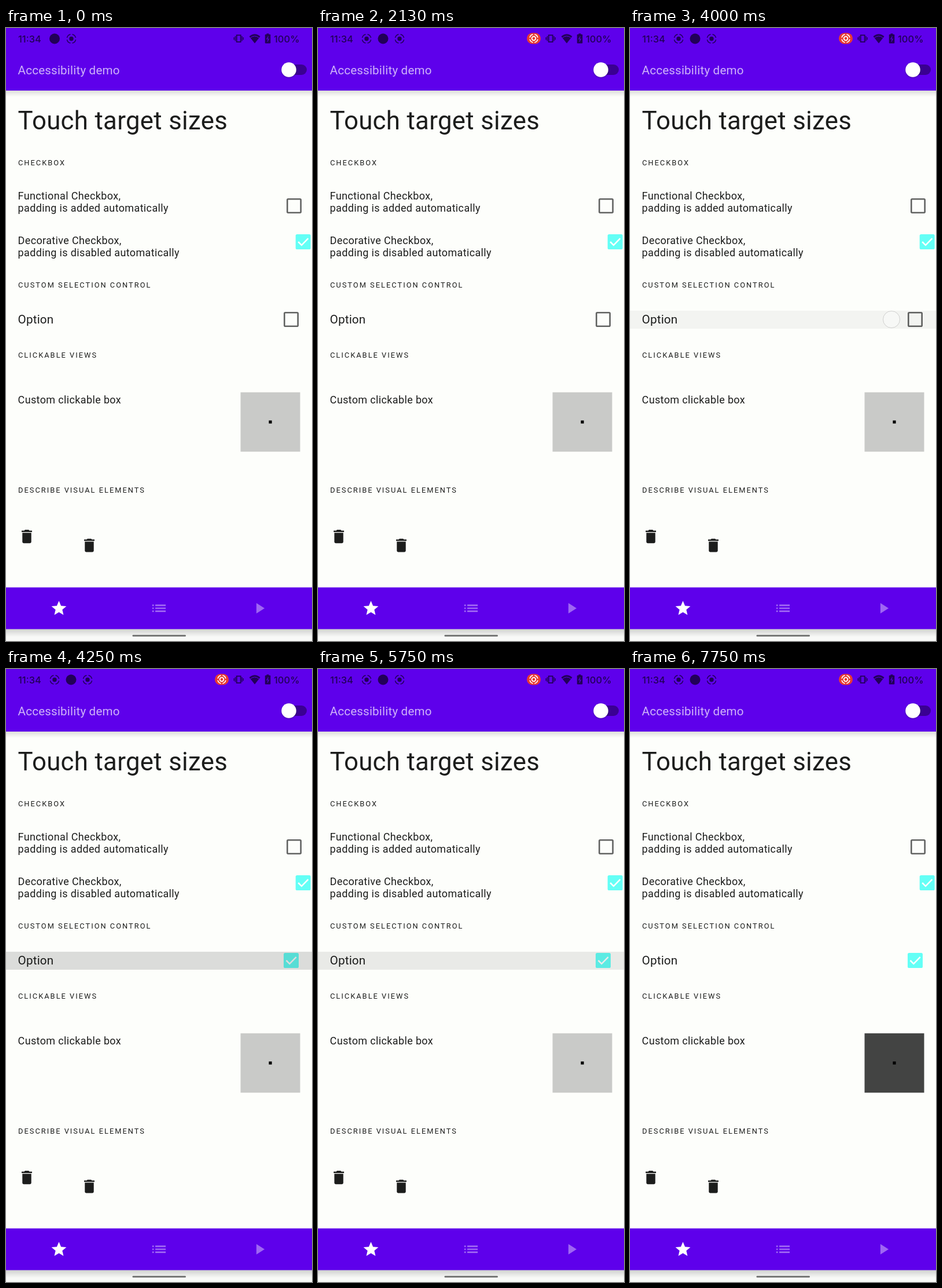
These frames come from a looping animation (529 by 1058 pixels, 8 s). An HTML page with a canvas:

```html
<!DOCTYPE html>
<html lang="en">
<head>
<meta charset="utf-8">
<title>Touch target sizes</title>
<style>
html, body { margin: 0; width: 100%; height: 100%; overflow: hidden; background: #fdfefb; }
canvas { display: block; width: 529px; height: 1058px; }
</style>
</head>
<body>
<canvas id="stage" width="529" height="1058"></canvas>
<script>
const ctx = document.getElementById('stage').getContext('2d');
const W = 529, LOOP = 8000, STEP = 125, DP = 1.287;
const PURPLE = '#5e00eb', STATUS = '#220058', PAPER = '#fdfefb', INK = '#1c1d1c', MINT = '#64fff6';

const ICON = {
  trash: new Path2D('M6 19c0 1.1.9 2 2 2h8c1.1 0 2-.9 2-2V7H6v12zM19 4h-3.5l-1-1h-5l-1 1H5v2h14V4z'),
  star: new Path2D('M12 17.27L18.18 21l-1.64-7.03L22 9.24l-7.19-.61L12 2 9.19 8.63 2 9.24l5.46 4.73L5.82 21z'),
  list: new Path2D('M3 13h2v-2H3v2zm0 4h2v-2H3v2zm0-8h2V7H3v2zm4 4h14v-2H7v2zm0 4h14v-2H7v2zM7 7v2h14V7H7z'),
  play: new Path2D('M8 5v14l11-7z')
};

const STYLE = {
  title: ['43.75px Roboto, sans-serif', 0.32],
  bar: ['20.6px Roboto, sans-serif', 0.19],
  body: ['18px Roboto, sans-serif', 0.36],
  over: ['12.87px Roboto, sans-serif', 2],
  status: ['500 16.5px Inter, sans-serif', 0]
};

// Taps: first step, last step, x, y
const TAPS = [
  [18, 19, 508, 312], [23, 24, 510, 312],
  [32, 33, 452, 503], [39, 40, 452, 503], [43, 44, 452, 503],
  [50, 51, 432, 704], [59, 61, 466, 690]
];
// Row highlight strength by step
const RIPPLE = {
  32: .04, 33: .12, 34: .135, 35: .06,
  39: .04, 40: .13, 41: .115, 42: .06, 43: .03, 44: .11, 45: .135, 46: .08
};

const within = (k, a, b) => k >= a && k < b;

function text(str, x, y, style, color = INK) {
  [ctx.font] = STYLE[style];
  ctx.letterSpacing = STYLE[style][1] + 'px';
  ctx.fillStyle = color;
  ctx.fillText(str, x, y);
}

function rect(x, y, w, h, color, r = 0) {
  ctx.fillStyle = color;
  ctx.beginPath();
  ctx.roundRect(x, y, w, h, r);
  ctx.fill();
}

function disc(x, y, r, color) {
  ctx.fillStyle = color;
  ctx.beginPath();
  ctx.arc(x, y, r, 0, 7);
  ctx.fill();
}

function line(points, width, color) {
  ctx.strokeStyle = color;
  ctx.lineWidth = width;
  ctx.beginPath();
  points.forEach(([x, y]) => ctx.lineTo(x, y));
  ctx.stroke();
}

function shade(y, h, from, to) {
  const g = ctx.createLinearGradient(0, y, 0, y + h);
  g.addColorStop(0, from);
  g.addColorStop(1, to);
  rect(0, y, W, h, g);
}

function icon(name, cx, cy, color) {
  ctx.save();
  ctx.translate(cx - 12 * DP, cy - 12 * DP);
  ctx.scale(DP, DP);
  ctx.fillStyle = color;
  ctx.fill(ICON[name]);
  ctx.restore();
}

function checkbox(x, y, on, fill = MINT) {
  if (on) {
    rect(x, y, 26, 26, fill, 2.6);
    line([[x + 4.5, y + 13], [x + 10.3, y + 18.8], [x + 21.7, y + 7.2]], 2.5, '#fff');
  } else {
    ctx.strokeStyle = '#626362';
    ctx.lineWidth = 2.6;
    ctx.beginPath();
    ctx.roundRect(x + 1.3, y + 1.3, 23.4, 23.4, 1.5);
    ctx.stroke();
  }
}

function ring(x, y, r, width, color) {
  ctx.strokeStyle = color;
  ctx.lineWidth = width;
  for (let i = 0; i < 4; i++) {
    const a = i * Math.PI / 2 + 0.2;
    ctx.beginPath();
    ctx.arc(x, y, r, a, a + 1.17);
    ctx.stroke();
  }
}

function castIcon(x) {
  ring(x, 18.5, 7.7, 1.5, STATUS);
  disc(x, 18.5, 3.7, STATUS);
}

function statusBar(p) {
  text('11:34', 21, 25, 'status', STATUS);
  ctx.globalAlpha = p;
  castIcon(84);
  ctx.globalAlpha = 1;
  disc(84 + 28.5 * p, 18.5, 9, STATUS);
  castIcon(113 + 28 * p);

  if (p > 0) {
    ctx.globalAlpha = p;
    rect(361, 8.5, 24, 19, '#e93a32', 9.5);
    ring(373, 18, 7, 1.6, '#fff');
    ctx.lineWidth = 1.8;
    ctx.beginPath();
    ctx.arc(373, 18, 3.3, 0, 7);
    ctx.stroke();
    ctx.globalAlpha = 1;
  }

  // Vibrate
  ctx.strokeStyle = STATUS;
  ctx.lineWidth = 1.8;
  ctx.strokeRect(398.7, 12.4, 7, 11.6);
  for (const s of [-1, 1]) {
    line([[402.2 + s * 5.8, 14], [402.2 + s * 5.8, 22.4]], 1.4, STATUS);
    line([[402.2 + s * 8, 16], [402.2 + s * 8, 20.4]], 1.4, STATUS);
  }

  // Wi-Fi
  ctx.fillStyle = STATUS;
  ctx.beginPath();
  ctx.moveTo(430, 26.5);
  ctx.lineTo(420.5, 14.5);
  ctx.quadraticCurveTo(430, 6.5, 439.5, 14.5);
  ctx.fill();
  ctx.strokeStyle = PURPLE;
  ctx.lineWidth = 1;
  ctx.beginPath();
  ctx.arc(430, 24.5, 10.5, -2.4, -0.74);
  ctx.stroke();

  // Battery
  rect(450.5, 9.5, 4, 3, STATUS);
  rect(447.8, 11, 9.5, 15.5, STATUS, 1.2);
  line([[453.4, 14.5], [451, 19], [454.2, 19], [451.8, 23.5]], 1.1, PURPLE);
  text('100%', 463, 25, 'status', STATUS);
}

function appBar(p) {
  rect(0, 0, W, 108, PURPLE);
  shade(108, 11, 'rgba(0,0,0,.13)', 'rgba(0,0,0,0)');
  statusBar(p);
  text('Accessibility demo', 20.6, 80, 'bar', '#cfb3f9');
  rect(482, 63, 38, 18, '#3a0092', 9);
  ctx.save();
  ctx.shadowColor = 'rgba(0,0,0,.3)';
  ctx.shadowBlur = 3;
  ctx.shadowOffsetY = 1;
  disc(489, 72, 12.8, '#fff');
  ctx.restore();
}

function bottomBar() {
  rect(0, 1037, W, 21, '#f8f9f7');
  shade(1037, 14, 'rgba(0,0,0,.17)', 'rgba(0,0,0,0)');
  rect(0, 965.5, W, 72, PURPLE);
  icon('star', 91.5, 1001.5, '#fff');
  icon('list', 264.5, 1001.5, '#9f66f3');
  icon('play', 438, 1001.5, '#9f66f3');
  rect(218.5, 1047.5, 92.5, 2.8, '#6a6b6a', 1.4);
}

function content(k) {
  text('Touch target sizes', 20.6, 175, 'title');

  text('CHECKBOX', 21, 236.5, 'over');
  text('Functional Checkbox,', 20.6, 295.5, 'body');
  text('padding is added automatically', 20.6, 316.5, 'body');
  const pressed = within(k, 18, 20) || within(k, 23, 25);
  checkbox(485, 294, within(k, 19, 25), pressed ? '#58e4d8' : MINT);

  text('Decorative Checkbox,', 20.6, 373, 'body');
  text('padding is disabled automatically', 20.6, 394, 'body');
  checkbox(500.7, 356, true);

  text('CUSTOM SELECTION CONTROL', 21, 448, 'over');
  text('Option', 20.6, 510, 'bar');
  checkbox(480, 490, within(k, 33, 41) || k >= 45);
  if (RIPPLE[k]) rect(0, 488, W, 31, `rgba(0,0,0,${RIPPLE[k]})`);

  text('CLICKABLE VIEWS', 21, 568.5, 'over');
  text('Custom clickable box', 20.6, 648, 'body');
  rect(405.5, 628.7, 103, 102.5, k >= 60 ? '#434443' : '#c9cac8');
  rect(454.4, 677.4, 5.2, 5.2, '#000');

  text('DESCRIBE VISUAL ELEMENTS', 21, 801.5, 'over');
  icon('trash', 36, 877.7, INK);
  icon('trash', 144, 893, INK);
}

function pointer(k) {
  for (const [from, to, x, y] of TAPS) {
    if (k < from || k > to) continue;
    disc(x, y, 14.5, 'rgba(255,255,255,.35)');
    ctx.strokeStyle = 'rgba(150,150,150,.4)';
    ctx.lineWidth = 1;
    ctx.stroke();
  }
}

function draw(t) {
  const k = Math.floor(t / STEP);
  rect(0, 0, W, 1058, PAPER);
  content(k);
  appBar(Math.min(1, k / 5));
  bottomBar();
  pointer(k);
}

const start = performance.now();
function tick() {
  draw((performance.now() - start) % LOOP);
  requestAnimationFrame(tick);
}
tick();
</script>
</body>
</html>
```
